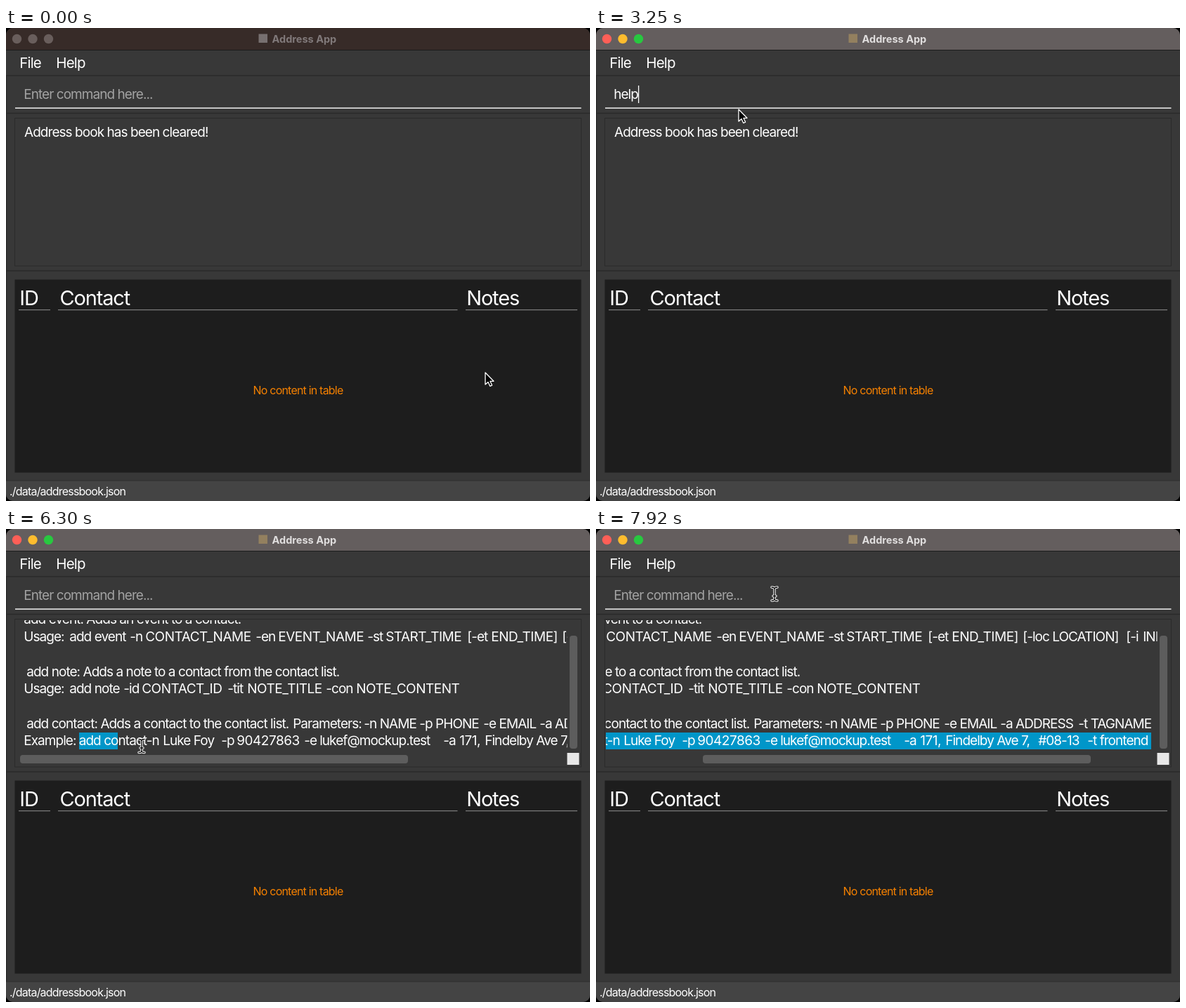
An HTML page that plays this animation: 831 by 674 pixels, repeating every 8 s.

```html
<!DOCTYPE html>
<html lang="en">
<head>
<meta charset="utf-8">
<title>Address App</title>
<style>
  html, body { margin: 0; width: 100%; height: 100%; overflow: hidden; background: #000; }
  svg { display: block; }
  text {
    font: 19px Inter, "Open Sans", sans-serif;
    font-optical-sizing: none;
    font-feature-settings: "calt" 0;
    letter-spacing: -0.05em;
    white-space: pre;
    fill: #fff;
  }
  .title { font-size: 14.5px; font-weight: 700; letter-spacing: 0; }
  .menu { font-size: 20.5px; letter-spacing: -0.04em; }
  .head { font-size: 29px; letter-spacing: -0.04em; }
  .small { font-size: 16px; }
  .loose { letter-spacing: -0.025em; }
</style>
</head>
<body>
<svg width="831" height="674" viewBox="0 0 831 674">
  <defs>
    <clipPath id="window"><rect width="831" height="674" rx="10"/></clipPath>
    <clipPath id="pane"><rect x="14" y="130" width="784.5" height="190"/></clipPath>
    <path id="ibeam" d="M-4 -9.5Q0 -9.5 0 -7Q0 -9.5 4 -9.5M0 -7V7M-4 9.5Q0 9.5 0 7Q0 9.5 4 9.5M-2 3H2"/>
  </defs>
  <g clip-path="url(#window)">
    <rect width="831" height="674" fill="#383838"/>
    <rect id="bar" width="831" height="31"/>
    <rect y="31" width="831" height="1" fill="#1c1c1c"/>
    <g id="lights">
      <circle cx="15.5" cy="15.5" r="6.7"/>
      <circle cx="38" cy="15.5" r="6.7"/>
      <circle cx="60.5" cy="15.5" r="6.7"/>
    </g>
    <rect id="icon" x="359.5" y="8.5" width="12.5" height="12.5"/>
    <text id="title" class="title" x="378.5" y="20.5">Address App</text>

    <text class="menu" x="19.3" y="57">File</text>
    <text class="menu" x="71.3" y="57">Help</text>
    <path d="M0 67.8H831M0 121.5H831M0 346H831M.5 68V645" stroke="#2a2a2a" stroke-width="1.5"/>
    <rect x="12.5" y="128.5" width="806" height="210.5" fill="none" stroke="#2a2a2a"/>
    <rect x="13" y="113.4" width="805.5" height="1.4" fill="#fff"/>
    <text id="field" x="25.2" y="101"></text>
    <rect id="caret" y="82" width="1.3" height="25" fill="#fff"/>

    <text id="cleared" x="26" y="154.5">Address book has been cleared!</text>
    <g id="result">
      <g clip-path="url(#pane)">
        <g id="content">
          <rect id="selection" x="104" y="290" height="24" fill="#0096c9"/>
        </g>
      </g>
      <rect id="vthumb" x="802" width="11" height="161" rx="4" fill="#5d5d5d"/>
      <rect id="hthumb" y="322" width="552" height="12" rx="4" fill="#5d5d5d"/>
      <rect x="798.5" y="319" width="17" height="17" fill="#e8e8e8"/>
    </g>

    <rect x="12.5" y="358.5" width="806" height="275" fill="#1d1d1d"/>
    <text class="head" x="19.3" y="395">ID</text>
    <text class="head" x="76.5" y="395">Contact</text>
    <text class="head" x="655.2" y="395">Notes</text>
    <path d="M18 401.7H63M74 401.7H642.5M654 401.7H813" stroke="#929292"/>
    <text class="small" x="415.5" y="522" text-anchor="middle" style="fill:#f58000">No content in table</text>

    <rect y="645" width="831" height="29" fill="#444"/>
    <rect y="644.5" width="831" height="1" fill="#2e2e2e"/>
    <text class="small" x="5" y="666">./data/addressbook.json</text>

    <path id="arrow" d="M0 0V17L4 13.4L6.8 19.4L9.6 18.1L6.9 12.3H12Z" fill="#000" stroke="#fff" stroke-width="1.3" stroke-linejoin="round"/>
    <g id="beam" fill="none" stroke-linecap="round">
      <use href="#ibeam" stroke="#fff" stroke-width="3.4"/>
      <use href="#ibeam" stroke="#000" stroke-width="1.3"/>
    </g>
  </g>
</svg>
<script>
const LOOP = 8000, ACTIVE = 1870, ENTER = 4060, SELECT = 6150;
const $ = id => document.getElementById(id);
const set = (id, attrs) => {
  for (const k in attrs) $(id).setAttribute(k, attrs[k]);
};
const show = (id, on) => set(id, { visibility: on ? "visible" : "hidden" });

// Help text: row number, then x and text of each run
const rows = [
  [0, 26, "add event: Adds an event to a contact."],
  [1, 26, "Usage:", 91, "add event", 177, "-n", 199, "CONTACT_NAME", 356, "-en", 388, "EVENT_NAME",
    515, "-st", 541, "START_TIME", 657, "[-et", 691, "END_TIME]", 792, "[-loc", 834, "LOCATION]",
    939, "[-i", 963, "INFORMATION]"],
  [3, 30, "add note: Adds a note to a contact from the contact list."],
  [4, 26, "Usage:", 91, "add note", 168, "-id", 194, "CONTACT_ID", 316, "-tit", 344, "NOTE_TITLE",
    456, "-con", 499, "NOTE_CONTENT"],
  [6, 30, "add contact: Adds a contact to the contact list.", 409, "Parameters:", 510, "-n NAME",
    589, "-p PHONE", 680, "-e EMAIL", 760, "-a ADDRESS", 871, "-t TAGNAME"],
  [7, 26, "Example:", 104.5, "add contact-n", 224, "Luke Foy", 307, "-p", 329, "90427863", 425, "-e",
    447, "lukef@mockup.test", 623, "-a", 646, "171,", 682, "Findelby Ave 7,", 814, "#08-13",
    884, "-t frontend"],
];
for (const [row, ...runs] of rows) {
  for (let i = 0; i < runs.length; i += 2) {
    const el = document.createElementNS("http://www.w3.org/2000/svg", "text");
    el.setAttribute("x", runs[i] - 0.8);
    el.setAttribute("y", 135.4 + row * 24.7);
    el.textContent = runs[i + 1];
    if (/_|\d{3}/.test(runs[i + 1])) el.classList.add("loose");
    $("content").append(el);
  }
}

// Linear value from [time, value...] keys
function at(keys, t, n = 1) {
  const i = keys.findIndex(k => k[0] > t);
  if (i < 0) return keys[keys.length - 1][n];
  if (i === 0) return keys[0][n];
  const a = keys[i - 1], b = keys[i];
  return a[n] + (b[n] - a[n]) * (t - a[0]) / (b[0] - a[0]);
}

const pointer = [
  [60, 682, 491], [460, 393, 225], [780, 479, 479], [1050, 452, 502],
  [2060, 452, 502], [2380, 203, 116], [4700, 203, 116], [4780, 190, 140], [4860, 182, 161],
  [5180, 182, 161], [5820, 104, 308], [6140, 104, 308], [6300, 193, 309], [6940, 776, 313],
  [7020, 790, 313], [7100, 822, 313], [7180, 776, 236], [7660, 776, 236], [7900, 254, 92.5],
];
const selected = [[6140, 104], [6300, 159], [6940, 774], [7020, 790], [7180, 974]];
const scrollX = [[7020, 0], [7180, 184]];
const scrollY = [[4700, 0], [4860, 19]];
const keystrokes = [2850, 2930, 3090, 3250, 3410, 3500, 3750, 3820];

function drawField(t) {
  const focused = t >= ACTIVE && t < SELECT;
  const typed = keystrokes.filter(k => k <= t).length;
  const text = t < ENTER ? "help add".slice(0, typed) : "";
  $("field").textContent = focused ? text : "Enter command here...";
  $("field").style.fill = focused ? "#fff" : "#a3a3a3";
  const since = t >= ENTER ? ENTER : typed ? keystrokes[typed - 1] : ACTIVE;
  show("caret", focused && Math.floor((t - since) / 500) % 2 === 0);
  set("caret", { x: 25.2 + (text ? $("field").getComputedTextLength() : 0) });
}

function drawTitle(active) {
  set("bar", { fill: active ? "#645e5e" : "#372b28" });
  set("icon", { fill: active ? "#93805f" : "#777070" });
  $("title").style.fill = active ? "#e0dede" : "#80797a";
  const colors = active ? ["#ff5f57", "#febc2e", "#28c840"] : Array(3).fill("#695e5c");
  [...$("lights").children].forEach((c, i) => c.setAttribute("fill", colors[i]));
}

function draw(t) {
  const step = Math.floor((t - 60) / 80) * 80 + 60;
  drawTitle(t >= ACTIVE);
  drawField(t);

  const sx = at(scrollX, step), sy = at(scrollY, step);
  $("cleared").style.display = t < ENTER ? "" : "none";
  $("result").style.display = t < ENTER ? "none" : "";
  set("content", { transform: `translate(${-sx} ${19 - sy})` });
  set("selection", { width: at(selected, step) - 104 });
  set("vthumb", { y: 135 + sy * 17 / 19 });
  set("hthumb", { x: 20 + sx * 132 / 184 });

  const transform = `translate(${at(pointer, step)} ${at(pointer, step, 2)})`;
  const hidden = t >= 1050 && t < 2120;
  set("arrow", { transform });
  set("beam", { transform });
  show("arrow", !hidden && step < 4780);
  show("beam", step >= 4780);
}

function frame() {
  draw(performance.now() % LOOP);
  requestAnimationFrame(frame);
}
frame();
</script>
</body>
</html>
```
